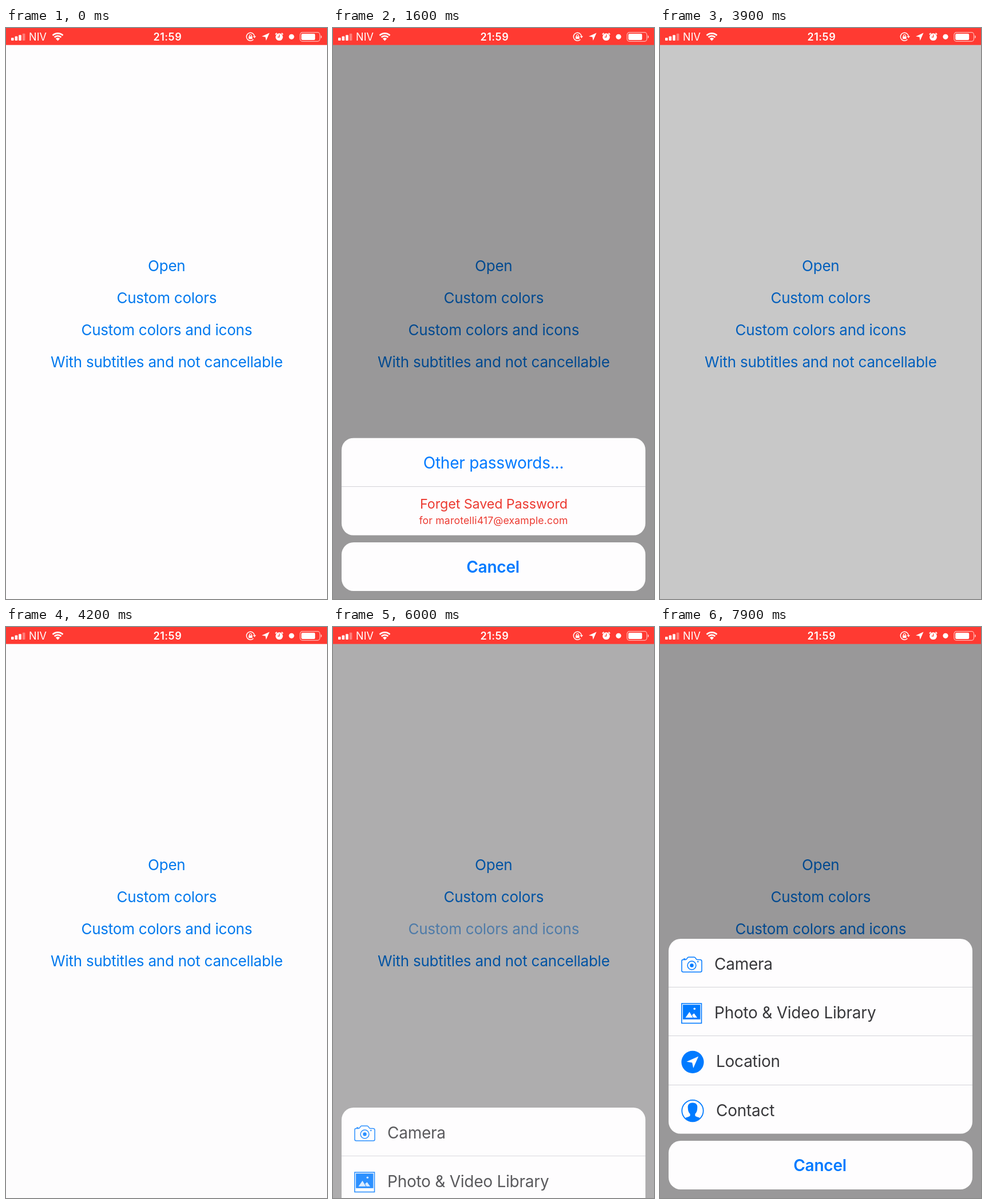
An HTML page with a canvas that plays this animation: 561x998 px, repeating every 8 s.

```html
<!DOCTYPE html>
<html lang="en">
<head>
<meta charset="utf-8">
<title>Action sheets</title>
<style>
html, body { margin: 0; width: 100%; height: 100%; overflow: hidden; background: #fefdfe; }
canvas { display: block; }
</style>
</head>
<body>
<canvas id="stage" width="561" height="998"></canvas>
<script>
const W = 561, H = 998, LOOP = 8000, STEP = 100;
const BLUE = '#007aff', LINK = '#0279ee', RED = '#ff3a32', PAPER = '#fefdfe';
const ROW = 85.2, LEFT = 15, WIDTH = 531, RADIUS = 21, BOTTOM = 885.8;
const ctx = document.getElementById('stage').getContext('2d');

const LINKS = ['Open', 'Custom colors', 'Custom colors and icons', 'With subtitles and not cancellable'];

// Each tap presses a link, releases it, then a sheet rises; "close" hides it.
const TAPS = [
  { link: 3, press: 900, release: 925, open: 970, close: 3850, rows: 2, draw: passwordRows },
  { link: 2, press: 5700, release: 5795, open: 5840, close: Infinity, rows: 4, draw: mediaRows }
];

function text(str, x, y, size, color, { align = 'center', weight = 400, track = -0.009 } = {}) {
  ctx.font = `${weight} ${size}px Inter, "Liberation Sans", sans-serif`;
  ctx.letterSpacing = track * size + 'px';
  ctx.textAlign = align;
  ctx.fillStyle = color;
  ctx.fillText(str, x, y);
}

function rect(x, y, w, h, color) {
  ctx.fillStyle = color;
  ctx.fillRect(x, y, w, h);
}

function roundRect(x, y, w, h, r) {
  ctx.beginPath();
  ctx.roundRect(x, y, w, h, r);
}

function disc(x, y, r, color) {
  ctx.beginPath();
  ctx.arc(x, y, r, 0, 7);
  ctx.fillStyle = color;
  ctx.fill();
}

function ring(x, y, r, width, color) {
  ctx.beginPath();
  ctx.arc(x, y, r, 0, 7);
  ctx.lineWidth = width;
  ctx.strokeStyle = color;
  ctx.stroke();
}

function fillPath(d, color) {
  ctx.fillStyle = color;
  ctx.fill(new Path2D(d));
}

function strokePath(d, width, color) {
  ctx.lineWidth = width;
  ctx.strokeStyle = color;
  ctx.stroke(new Path2D(d));
}

function at(x, y, draw) {
  ctx.save();
  ctx.translate(x, y);
  draw();
  ctx.restore();
}

function statusBar() {
  rect(0, 0, W, 29.7, RED);
  for (let i = 0; i < 4; i++) {
    const h = 5 + i * 2.4;
    roundRect(9 + i * 6.6, 22 - h, 4.6, h, 1);
    ctx.fillStyle = i < 3 ? '#fff' : 'rgba(255,255,255,.35)';
    ctx.fill();
  }
  text('NIV', 40, 22, 18, '#fff', { align: 'left', track: 0.005 });
  text('21:59', 282.3, 22, 18, '#fff', { weight: 600, track: 0.03 });

  // Wi-Fi fan
  const a = Math.PI / 4;
  ctx.strokeStyle = '#fff';
  ctx.lineWidth = 2.8;
  for (const r of [8.2, 12.6]) {
    ctx.beginPath();
    ctx.arc(90.5, 22, r, -a * 3, -a);
    ctx.stroke();
  }
  fillPath('M90.5 22.5L86.8 18.6Q90.5 15.6 94.2 18.6Z', '#fff');

  // Rotation lock
  ctx.lineWidth = 1.5;
  ctx.beginPath();
  ctx.arc(427.3, 15.3, 7, 0.75, 6.1);
  ctx.stroke();
  fillPath('M431.6 14.2h5.4l-2.7 3.6z', '#fff');
  rect(424, 14.6, 6.6, 4.6, '#fff');
  strokePath('M425.4 14.8v-1.4a1.9 1.9 0 0 1 3.8 0v1.4', 1.2, '#fff');

  fillPath('M460.5 8.5L454.6 22L453.4 15.8L447 14.8Z', '#fff');

  // Alarm clock
  disc(477.5, 15.7, 6.4, '#fff');
  strokePath('M470.8 11.4L473.4 8.9M484.2 11.4L481.6 8.9', 1.8, '#fff');
  strokePath('M477.6 11.6V15.8H474.6', 1.2, RED);

  disc(499, 15.3, 4.6, '#fff');

  // Battery
  roundRect(514, 7.7, 34.5, 15.6, 4);
  ctx.lineWidth = 1.2;
  ctx.strokeStyle = 'rgba(255,255,255,.65)';
  ctx.stroke();
  roundRect(516.2, 10, 24, 11, 2);
  ctx.fillStyle = '#fff';
  ctx.fill();
  fillPath('M550 12.8q2 .6 2 2.7t-2 2.7z', 'rgba(255,255,255,.65)');
}

function cameraIcon() {
  strokePath('M3 5.5H7.6Q9 5.5 9.8 4L11 2.2Q11.6 1 13 1H22.5Q24 1 24.7 2.2L26 4Q26.8 5.5 28.2 5.5H33' +
    'Q36 5.5 36 8.5V24.5Q36 27 33.5 27H3.5Q1 27 1 24.5V8Q1 5.5 3 5.5Z', 1.5, BLUE);
  strokePath('M4 4H7.5', 1.4, BLUE);
  ring(18.5, 15.5, 7.4, 1.5, BLUE);
  disc(18.5, 15.5, 3.2, BLUE);
  disc(29.3, 9, 1.2, BLUE);
}

function photoIcon() {
  ctx.lineWidth = 1.6;
  ctx.strokeStyle = BLUE;
  ctx.strokeRect(0.9, 0.9, 34.6, 34.4);
  rect(3, 3, 30.4, 25.6, BLUE);
  fillPath('M7.5 25.5L14.5 15.5L20.5 25.5ZM19 21L22.5 18L28 25.5H21.5Z', '#fff');
  disc(23.3, 10, 1.8, '#fff');
}

function locationIcon() {
  disc(0, 0, 19.6, BLUE);
  fillPath('M10.2 -10L1.2 10.6L-0.8 1.2L-10.6 -0.6Z', '#fff');
}

function contactIcon() {
  ring(0, 0, 18.7, 1.8, BLUE);
  fillPath('M0 -14C6.5 -14 9 -10 8.2 -4.5C8 1 6.2 3.8 4.4 5.4V8.6C6 10.6 10.5 11 13.2 12.6' +
    'Q8 18.4 0 18.4T-13.2 12.6C-10.5 11 -6 10.6 -4.4 8.6V5.4C-6.2 3.8 -8 1 -8.2 -4.5C-9 -10 -6.5 -14 0 -14Z', BLUE);
}

function passwordRows(top, t, fade) {
  if (t >= 3500) {
    rect(LEFT, top + ROW, WIDTH, ROW, t < 3600 ? '#f4f3f6' : '#eeedf0');
  }
  ctx.globalAlpha = fade;
  text('Other passwords...', W / 2, top + 54, 28, BLUE);
  text('Forget Saved Password', W / 2 + 0.5, top + 124, 23.3, '#ec3a31', { track: -0.004 });
  text('for marotelli417@example.com', W / 2, top + 151, 17.6, '#ec3a31', { track: 0.01 });
}

function mediaRows(top, t, fade) {
  ctx.globalAlpha = fade;
  const items = [
    ['Camera', 95, 37, 31, cameraIcon],
    ['Photo & Video Library', 95, 37, 27, photoIcon],
    ['Location', 98, 57, 45, locationIcon],
    ['Contact', 98, 57, 45, contactIcon]
  ];
  items.forEach(([label, x, ix, iy, icon], i) => {
    const y = top + i * ROW;
    text(label, x, y + 54, 28, '#38383b', { align: 'left' });
    at(ix, y + iy, icon);
  });
}

function sheet(tap, t) {
  const u = t - tap.open;
  if (u < 0 || t >= tap.close) return;
  const drop = Math.round(2180 * Math.exp(-u / 80));
  const fade = Math.min(1, 1.03 - Math.exp(-u / 100));
  const height = tap.rows * ROW;
  const top = BOTTOM - height + drop;
  if (top > H) return;

  ctx.save();
  roundRect(LEFT, top, WIDTH, height, RADIUS);
  ctx.clip();
  rect(LEFT, top, WIDTH, height, '#fefdfe');
  tap.draw(top, t, fade);
  for (let i = 1; i < tap.rows; i++) {
    rect(LEFT, Math.round(top + i * ROW) - 1, WIDTH, 1, '#d3d3d8');
  }
  ctx.restore();

  roundRect(LEFT, 898 + drop, WIDTH, 85, RADIUS);
  ctx.fillStyle = '#fefdfe';
  ctx.fill();
  ctx.save();
  ctx.globalAlpha = fade;
  text('Cancel', W / 2 - 1, 951 + drop, 28, BLUE, { weight: 600 });
  ctx.restore();
}

function shade(tap, t) {
  if (t < tap.open) return 0;
  if (t < tap.close) return 0.4 * (1 - Math.exp(-(t - tap.open) / 100));
  return 0.4 * Math.exp(-(t - tap.close) / 78);
}

function linkAlpha(i, t) {
  const tap = TAPS.find(p => p.link === i);
  if (!tap || t < tap.press) return 1;
  return Math.min(1, 0.2 + 0.8 * Math.max(0, t - tap.release) / 470);
}

function render(t) {
  rect(0, 0, W, H, PAPER);
  LINKS.forEach((label, i) => {
    ctx.globalAlpha = linkAlpha(i, t);
    text(label, W / 2 + 0.3, 425 + i * 56, 26, LINK);
  });
  ctx.globalAlpha = 1;
  const dim = Math.max(...TAPS.map(tap => shade(tap, t)));
  rect(0, 0, W, H, `rgba(0,0,0,${dim.toFixed(4)})`);
  statusBar();
  TAPS.forEach(tap => sheet(tap, t));
}

const start = performance.now();
function loop() {
  const t = (performance.now() - start) % LOOP;
  render(Math.floor(t / STEP) * STEP);
  requestAnimationFrame(loop);
}
loop();
</script>
</body>
</html>
```
